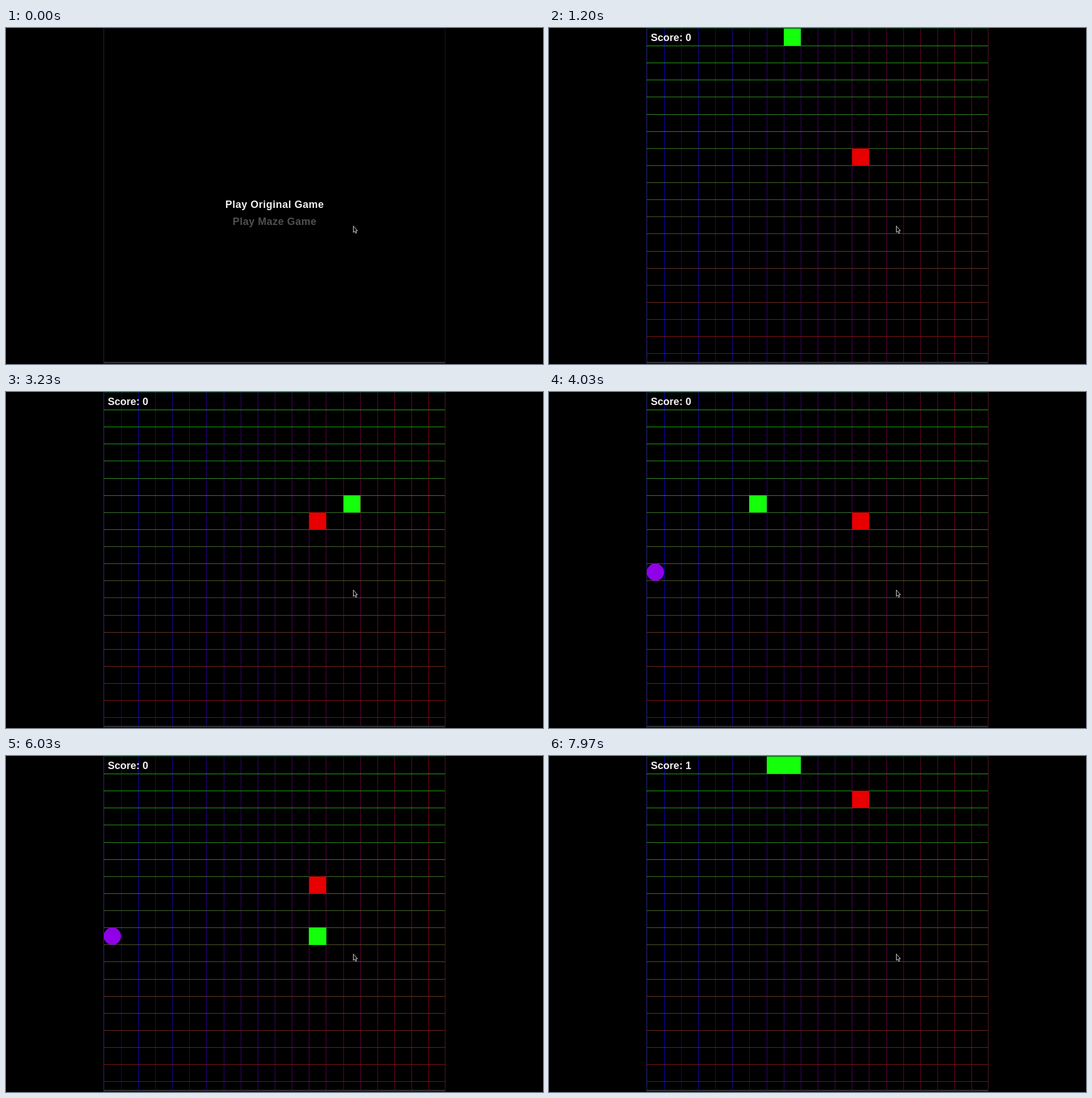
Write an HTML page that moves like this. It is 947x592 px and loops after 8000 ms.

```html
<!DOCTYPE html>
<html lang="en">
<head>
<meta charset="utf-8">
<title>Snake</title>
<style>
  html, body { margin: 0; width: 100%; height: 100%; overflow: hidden; background: #000; }
  svg { display: block; width: 100%; height: 100%; }
  text { font: bold 18.1px "Liberation Sans", Arial, sans-serif; fill: #f0f0f0; }
  #menu text { font-size: 18px; letter-spacing: .5px; }
  #grid, #frame, #snake { shape-rendering: crispEdges; }
  .hidden { display: none; }
</style>
</head>
<body>
<svg viewBox="0 0 947 592">
  <rect width="947" height="592"/>
  <g id="frame">
    <path d="M172 .5H775" stroke="#101028"/>
    <path d="M172.5 0V592" stroke="#28282e"/>
    <path d="M774.5 0V592" stroke="#17171c"/>
    <path d="M172 589.5H774" stroke="#2b2b2b" stroke-width="3"/>
  </g>
  <g id="menu">
    <text x="386.7" y="317">Play Original Game</text>
    <text x="399.7" y="347" style="fill:#505050">Play Maze Game</text>
  </g>
  <g id="game">
    <g id="grid"></g>
    <circle id="bonus" cx="187.6" cy="317.5" r="15.2" fill="#9000e8"/>
    <rect id="food" width="29.6" height="29.6" fill="#e80000" stroke="#b00000"/>
    <g id="snake" fill="#14ff0a"></g>
    <text id="score" x="179.4" y="22.5"></text>
  </g>
  <path d="M612.5 348.8V360.2L614.9 357.9L616.6 361.7L618.4 360.9L616.8 357.2H619.8Z" fill="#080808" stroke="#d8d8d8"/>
</svg>
<script>
const LOOP = 8000, GAME_START = 70, FIRST_STEP = 493.5, STEP = 99.5;
const BONUS_ON = 3250, BONUS_OFF = 7570;
const CELL = 30.13, LEFT = 172.7, TOP = .9, COUNT = 20;
const FOODS = [[12, 7], [12, 2]];
const HEADINGS = { U: [0, -1], D: [0, 1], L: [-1, 0], R: [1, 0] };
const ROUTE = "U12 R2 U8 R4 U2 L18 D5 L4 U6 L7 U5 R3";

const $ = id => document.getElementById(id);
const make = (tag, attrs, parent) => {
  const node = document.createElementNS("http://www.w3.org/2000/svg", tag);
  for (const key in attrs) node.setAttribute(key, attrs[key]);
  return parent.appendChild(node);
};
const px = col => LEFT + col * CELL;
const py = row => TOP + row * CELL;
const rgb = (...channels) => `rgb(${channels.map(Math.round)})`;

function drawGrid() {
  for (let i = 0; i <= COUNT; i++) {
    const k = i / COUNT;
    const x = Math.min(Math.max(Math.round(px(i)), 172), 774) - (i ? 0 : 1);
    make("path", {
      d: `M${Math.max(x, 172) + .5} 0V588`,
      stroke: i === 0 ? "#2c2c90" : i === COUNT ? "#5a1820" : rgb(140 * k, 0, 190 * (1 - k) + 12)
    }, $("grid"));
  }
  for (let i = 0; i < COUNT; i++) {
    const k = i / COUNT;
    make("path", {
      d: `M172 ${i ? Math.round(py(i)) + .5 : .5}H774`,
      stroke: i ? rgb(15 + 130 * k, 190 * (1 - k), 45 * Math.sin(Math.PI * k)) : "#003c20"
    }, $("grid"));
  }
}

// Unroll the route into one cell per step, wrapping at the edges.
const cells = [[8, 8]];
for (const leg of ROUTE.split(" ")) {
  const [dx, dy] = HEADINGS[leg[0]];
  for (let n = +leg.slice(1); n > 0; n--) {
    const [x, y] = cells[cells.length - 1];
    cells.push([(x + dx + COUNT) % COUNT, (y + dy + COUNT) % COUNT]);
  }
}
const mealStep = cells.findIndex(([x, y]) => x === FOODS[0][0] && y === FOODS[0][1]);

drawGrid();
const body = [0, 1].map(() => make("rect", { width: 30.3, height: 30.3 }, $("snake")));
const place = (node, [col, row], inset = 0) => {
  node.setAttribute("x", px(col) + inset);
  node.setAttribute("y", py(row) + inset);
};
const show = (node, on) => node.classList.toggle("hidden", !on);

function render() {
  const t = performance.now() % LOOP;
  const step = Math.max(0, Math.min(cells.length - 1, Math.floor((t - FIRST_STEP) / STEP) + 1));
  const score = step >= mealStep ? 1 : 0;
  show($("menu"), t < GAME_START);
  show($("game"), t >= GAME_START);
  show($("bonus"), t >= BONUS_ON && t < BONUS_OFF);
  place($("food"), FOODS[score], .5);
  body.forEach((part, i) => {
    show(part, i <= score);
    place(part, cells[Math.max(0, step - i)]);
  });
  $("score").textContent = "Score: " + score;
  requestAnimationFrame(render);
}
render();
</script>
</body>
</html>
```
